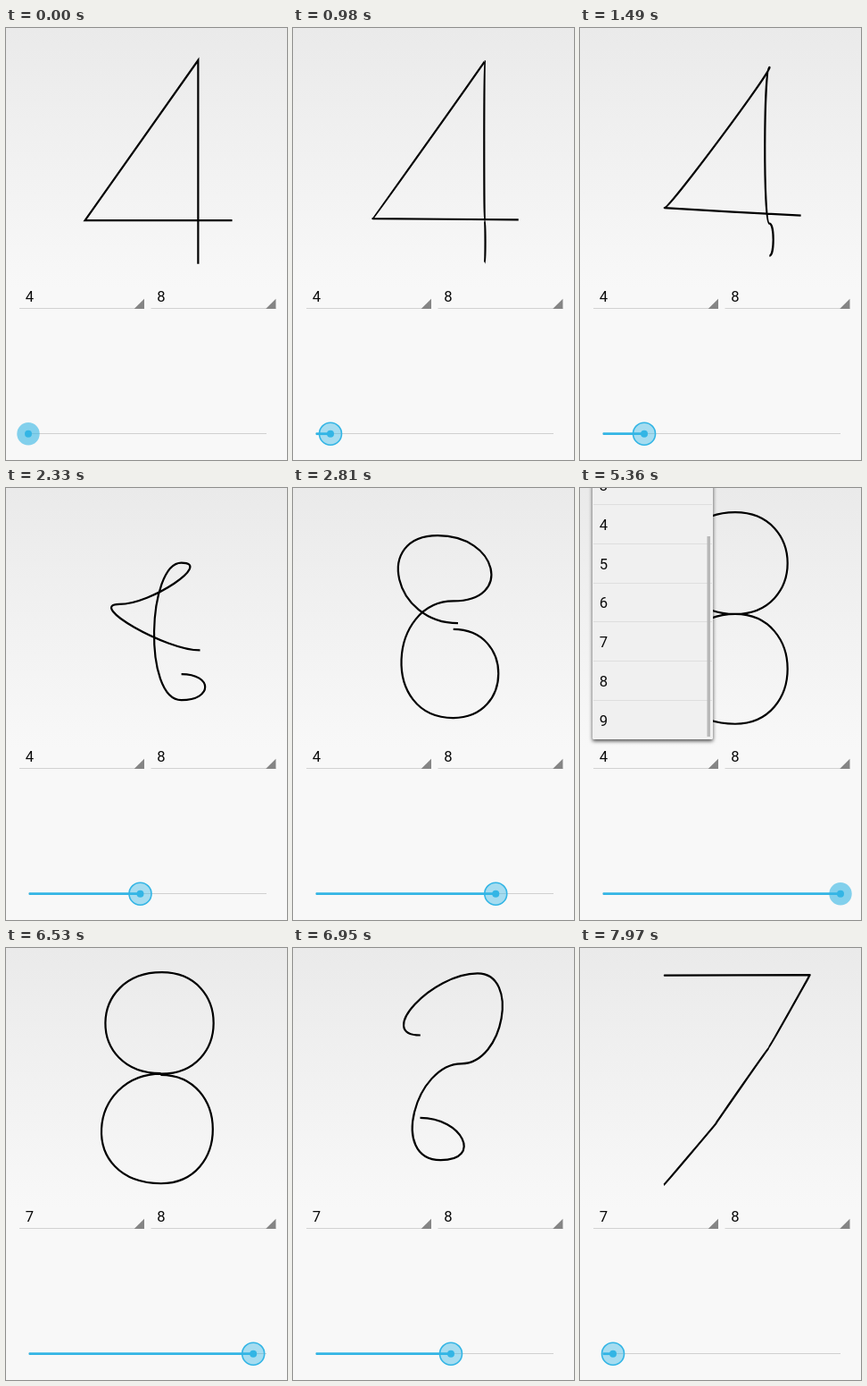
An HTML page that plays this animation: 315 by 483 pixels, repeating every 8000 ms.

```html
<!DOCTYPE html>
<html lang="en">
<head>
<meta charset="utf-8">
<title>Digit morph</title>
<style>
  html, body { margin: 0; width: 100%; height: 100%; overflow: hidden; background: #f8f8f8; }
  svg { display: block; width: 100vw; height: 100vh; }
  text { font: 16.6px Roboto, Arial, sans-serif; fill: #0a0a0a; }
  #sheet { filter: drop-shadow(0 2.5px 2px rgba(0, 0, 0, .7)); }
</style>
</head>
<body>
<svg viewBox="0 0 315 483">
  <defs>
    <linearGradient id="sky" x1="0" y1="0" x2="0" y2="1">
      <stop offset="0" stop-color="#eaeaea"/>
      <stop offset="1" stop-color="#f8f8f8"/>
    </linearGradient>
    <g id="spinner">
      <path d="M0 313.5H140" fill="none" stroke="#d2d2d2"/>
      <path d="M140 302.700V314H128.700Z" fill="#858585"/>
    </g>
  </defs>
  <rect width="315" height="483" fill="#f8f8f8"/>
  <rect width="315" height="290" fill="url(#sky)"/>

  <path id="digit" fill="none" stroke="#000" stroke-width="2.2"/>

  <use href="#spinner" x="15"/>
  <use href="#spinner" x="162.500"/>
  <text id="fromText" x="21.800" y="305.800">4</text>
  <text x="169.300" y="305.800">8</text>

  <path d="M25 453.500H292" stroke="#d0d0d0"/>
  <path id="bar" stroke="#33b5e5" stroke-width="2.800"/>
  <g id="knob">
    <circle id="halo" r="12.700" fill="#33b5e5"/>
    <circle id="ring" r="12.500" fill="none" stroke="#33b5e5" stroke-width="1.600"/>
    <circle r="4" fill="#33b5e5"/>
  </g>

  <g id="popup">
    <rect id="sheet" x="14" y="-20" width="135" height="301" rx="1.500" fill="#f0f0f0"/>
    <g id="items"></g>
    <rect x="142.500" y="54" width="3.500" height="224" fill="#b8b8b8"/>
  </g>
</svg>
<script>
const $ = id => document.getElementById(id);
const LOOP = 8000, STEP = 30;
const LEFT = 25, TOP = -0.9, WIDTH = 267, HEIGHT = 267.6;

// A digit is a start point and four cubic segments; straight ones double their ends.
const corners = pts => pts.flatMap((p, i) => i ? [pts[i - 1], p, p] : [p]);
const FOUR = corners([[.856, .807], [.238, .807], [.713, .138], [.713, .807], [.713, .989]]);
const SEVEN = corners([[.26, .116], [.873, .116], [.7, .419], [.477, .735], [.257, .996]]);

const waist = [.558, .53], near = .243, right = .851;
const lobe = (y, left) => [
  [near, waist[1]], [left, y], [waist[0], y],
  [right, y], [right, waist[1]], waist
];
const EIGHT = [waist, ...lobe(.105, near), ...lobe(.989, .199)];

// Finger positions on the slider: time, x.
const DRAG_RIGHT = [[650, 25], [1490, 72], [2330, 150.5], [3080, 273], [3230, 292]];
const DRAG_LEFT = [[6500, 284.5], [6950, 177], [7970, 37]];

const clamp = v => Math.min(1, Math.max(0, v));

// Smooth curve through the keys, with slopes taken from the neighbours.
function along(keys, t) {
  const last = keys.length - 1;
  const slope = i => {
    const a = keys[Math.max(0, i - 1)], b = keys[Math.min(last, i + 1)];
    return (b[1] - a[1]) / (b[0] - a[0]);
  };
  const i = Math.max(1, keys.findIndex(k => t <= k[0]));
  if (t >= keys[last][0]) return keys[last][1];
  const [t0, x0] = keys[i - 1], [t1, x1] = keys[i];
  const d = t1 - t0, u = clamp((t - t0) / d), w = 1 - u;
  return w * w * ((1 + 2 * u) * x0 + u * d * slope(i - 1)) +
         u * u * ((3 - 2 * u) * x1 - w * d * slope(i));
}

function digitPath(a, b, p) {
  const pts = a.map(([x, y], i) => [
    (LEFT + WIDTH * (x + (b[i][0] - x) * p)).toFixed(2),
    (TOP + HEIGHT * (y + (b[i][1] - y) * p)).toFixed(2)
  ].join(" "));
  return "M" + pts[0] + "C" + pts.slice(1).join(" ");
}

// Grows in with a deceleration, then shrinks away.
const popupAmount = t => t < 5450
  ? 1 - (1 - clamp((t - 4130) / 240)) ** 2.5
  : 1 - clamp((t - 5420) / 270) ** 1.5;

for (let n = 3; n <= 9; n++) {
  const y = 46.9 + (n - 4) * 43.75;
  $("items").innerHTML += `<text x="21.8" y="${y}">${n}</text>` +
    (n < 9 ? `<path d="M15 ${Math.round(y + 15) + .5}H148" stroke="#dedede"/>` : "");
}

function draw(time) {
  const t = Math.max(0, 20 + STEP * Math.floor((time - 20) / STEP));
  const x = along(t < 6320 ? DRAG_RIGHT : DRAG_LEFT, t);
  const p = (1 - Math.cos(Math.PI * (x - LEFT) / WIDTH)) / 2;
  const held = (t >= 500 && t < 3620) || t >= 6320;
  const seven = t >= 5480;

  $("digit").setAttribute("d", digitPath(seven ? SEVEN : FOUR, EIGHT, p));
  $("fromText").textContent = seven ? "7" : "4";

  $("bar").setAttribute("d", x > LEFT + 1 ? `M25.7 453.7H${x.toFixed(2)}` : "");
  $("knob").setAttribute("transform", `translate(${x.toFixed(2)} 453.7)`);
  $("halo").setAttribute("opacity", held ? .42 : .6);
  $("ring").setAttribute("visibility", held ? "visible" : "hidden");

  const open = popupAmount(t), sy = .5 + open / 2;
  $("popup").setAttribute("display", open > 0 ? "inline" : "none");
  $("popup").setAttribute("opacity", open.toFixed(3));
  $("popup").setAttribute("transform", `translate(0 ${(281 * (1 - sy)).toFixed(2)}) scale(1 ${sy.toFixed(4)})`);
}

const start = performance.now();
function tick() {
  draw((performance.now() - start) % LOOP);
  requestAnimationFrame(tick);
}
tick();
</script>
</body>
</html>
```
